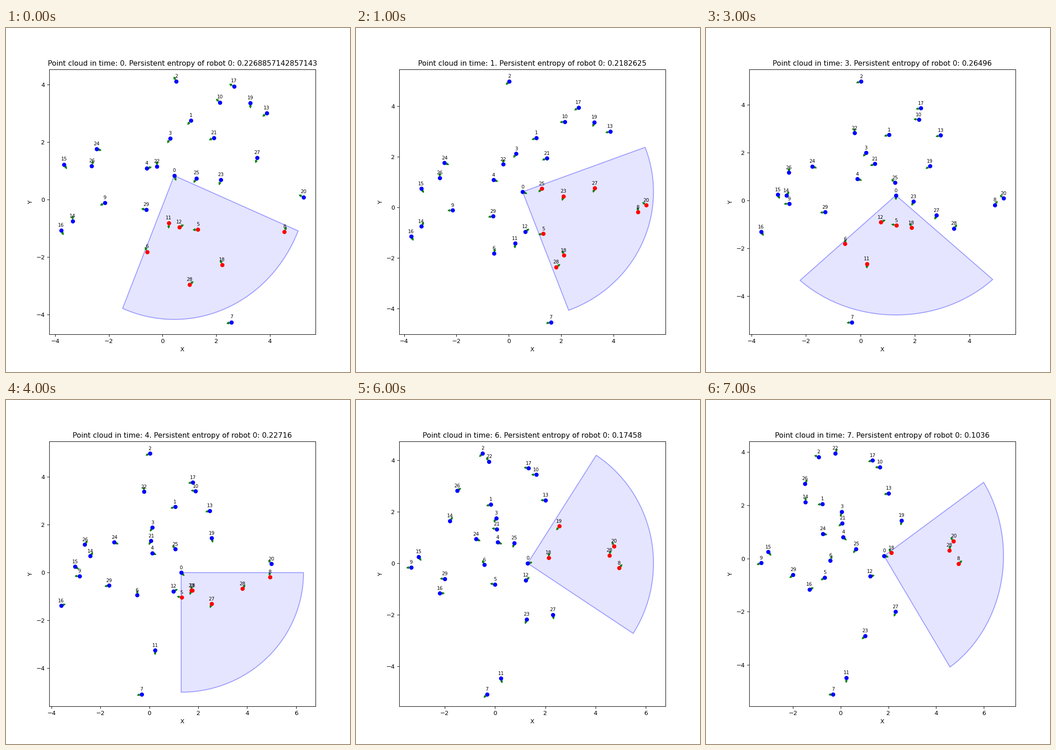
Animation, 748 px wide and 748 px high, one loop 8000 ms. Source, as a matplotlib script:

```python
import numpy as np
import matplotlib.pyplot as plt
from matplotlib.animation import FuncAnimation

SIDE, DPI = 8, 93.5         # 748 x 748 pixels
STEPS = 8
REACH, HALF_VIEW = 5, 45    # field of view of robot 0
LOOK = (-67.6, -24.4, -57, -89.7, -45, -45.4, 12, -11.5)
ENTROPY = ("0.2268857142857143", "0.2182625", "0.24138333333333334", "0.26496",
           "0.22716", "0.19982", "0.17458", "0.1036")

rng = np.random.default_rng(4)
robots = []


def robot(*keys):
    """Travels in straight lines between (time, x, y) keys and rests before and after.

    It faces the way it goes; at rest it looks around near its general course.
    """
    times, xs, ys = np.array(keys).T
    t = np.arange(STEPS + 1)
    x, y = np.interp(t, times, xs), np.interp(t, times, ys)
    dx, dy = np.diff(x), np.diff(y)
    course = np.degrees(np.arctan2(dy, dx))
    general = np.degrees(np.arctan2(ys[-1] - ys[0], xs[-1] - xs[0]))
    glance = general + rng.uniform(-40, 40, STEPS)
    heading = np.where(np.hypot(dx, dy) > 0.02, course, glance)
    robots.append(np.column_stack((x[:-1], y[:-1], heading)))


robot((0, .435, .83), (1, .526, .61), (3, 1.3, .21), (4, 1.3, -.01), (6, 1.3, -.01),
      (7, 1.82, .095))
robot((4, 1.05, 2.745), (7, -.77, 2.05))
robot((0, .51, 4.11), (1, .02, 4.977), (5, .02, 4.977), (6, -.49, 4.26), (7, -.92, 3.81))
robot((2, .28, 2.12), (5, .05, 1.75))
robot((1, -.59, 1.085), (4, .11, .81))
robot((4, 1.317, -1.04), (7, -.66, -.72))
robot((3, -.57, -1.82), (5, -.43, -.07))
robot((0, 2.566, -4.264), (3, -.317, -5.09))
robot((0, 4.54, -1.12), (1, 4.93, -.19))
robot((1, -2.15, -.12), (6, -3.33, -.17))
robot((3, 2.14, 3.38), (5, 1.64, 3.43))
robot((0, .23, -.82), (6, .24, -4.48))
robot((2.5, .62, -.96), (5, 1.23, -.67))
robot((1, 3.875, 3), (5, 2.01, 2.44))
robot((1, -3.35, -.75), (7, -1.47, 2.11))
robot((0, -3.665, 1.22), (2, -3.035, .245))
robot((0, -3.776, -1.07), (4, -3.605, -1.39), (5, -3.07, -1.19), (7, -1.31, -1.16))
robot((2, 2.66, 3.94), (5, 1.34, 3.68))
robot((0, 2.215, -2.28), (5, 1.64, -.37), (6, 2.13, .21))
robot((1, 3.27, 3.36), (3, 2.55, 1.43))
robot((3, 5.25, .083), (5, 4.73, .65))
robot((0, 1.907, 2.144), (4, .07, 1.32))
robot((0, -.207, 1.144), (5, -.23, 3.945))
robot((0, 2.164, .68), (3, 1.94, -.04), (7, 1.03, -2.9))
robot((1, -2.457, 1.758), (6, -.75, .93))
robot((3, 1.26, .74), (5, .87, 1.21), (7, .65, .35))
robot((4, -2.636, 1.165), (6, -1.506, 2.806))
robot((0, 3.525, 1.448), (5, 2.3, -2))
robot((0, 1, -2.96), (3, 3.43, -1.17), (6, 4.55, .3))
robot((1, -.6, -.353), (5, -1.99, -.615))
robots[0][:, 2] = LOOK


def view_sector(x, y, heading):
    angles = np.radians(np.linspace(heading - HALF_VIEW, heading + HALF_VIEW, 181))
    xs = np.concatenate(([x], x + REACH * np.cos(angles)))
    ys = np.concatenate(([y], y + REACH * np.sin(angles)))
    return xs, ys


def is_seen(x, y, eye):
    dx, dy = x - eye[0], y - eye[1]
    off = (np.degrees(np.arctan2(dy, dx)) - eye[2] + 180) % 360 - 180
    return 0 < np.hypot(dx, dy) <= REACH and abs(off) <= HALF_VIEW


def padded(values):
    low, high = min(values), max(values)
    pad = 0.05 * (high - low)
    return low - pad, high + pad


fig, ax = plt.subplots(figsize=(SIDE, SIDE), dpi=DPI)


def draw(t):
    ax.clear()
    poses = [path[t] for path in robots]
    eye = poses[0]
    xs, ys = view_sector(*eye)
    ax.fill(xs, ys, fc=(0, 0, 1, 0.1), ec=(0, 0, 1, 0.35), lw=1.5)

    for i, (x, y, heading) in enumerate(poses):
        a = np.radians(heading)
        ax.arrow(x, y, 0.1 * np.cos(a), 0.1 * np.sin(a),
                 head_width=0.08, head_length=0.08, fc="g", ec="g")
        ax.plot(x, y, "o", color="red" if is_seen(x, y, eye) else "blue")
        ax.text(x, y + 0.1, str(i), fontsize=8, ha="center", va="bottom")

    ax.set_xlim(padded([*xs, *(p[0] for p in poses)]))
    ax.set_ylim(padded([*ys, *(p[1] for p in poses)]))
    ax.set_xlabel("X")
    ax.set_ylabel("Y")
    ax.set_title(f"Point cloud in time: {t}. Persistent entropy of robot 0: {ENTROPY[t]}")


anim = FuncAnimation(fig, draw, frames=STEPS, interval=1000, repeat=True)
plt.show()
```
